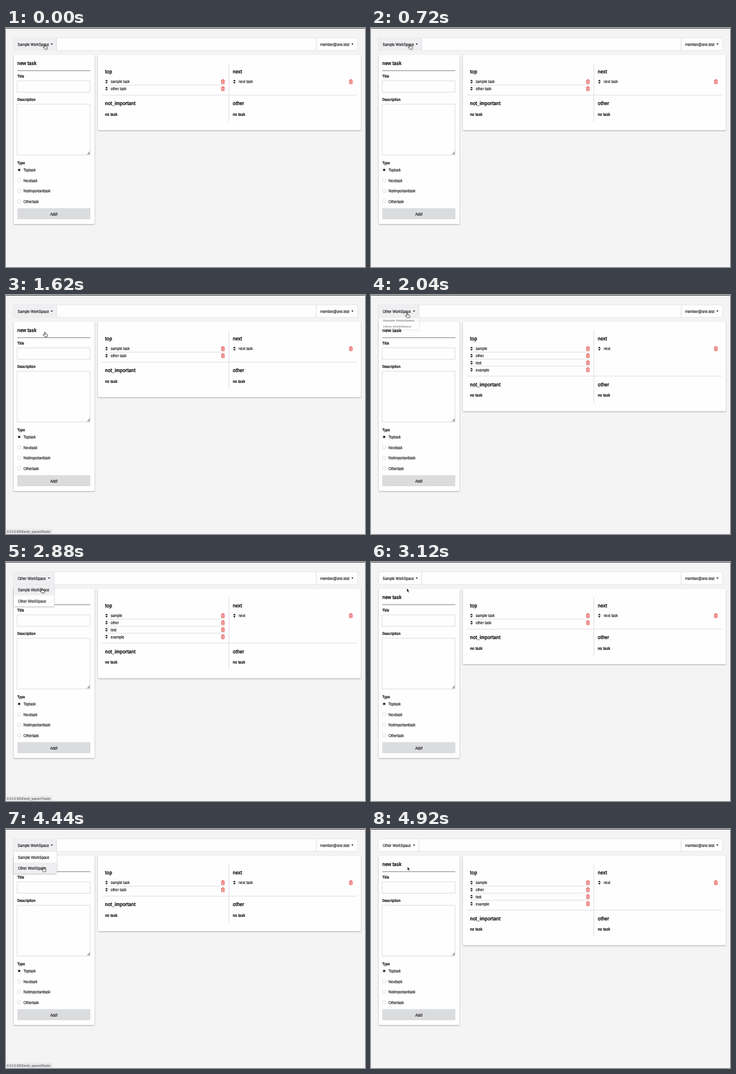
Recreate the animation shown at these times as an HTML page. Size 600x400 px, loop 4.98 s.

```html
<!DOCTYPE html>
<html lang="en">
<head>
<meta charset="utf-8">
<title>Task board</title>
<style>
:root { --paper: #f4f4f5; --hover: #efeff1; --line: #dedee3; --ink: #0c0c0e; }
html, body { margin: 0; width: 100%; height: 100%; overflow: hidden; background: var(--paper); }
svg { display: block; width: 600px; height: 400px; }

/* The screen has narrow pixels, so all type shares one aspect ratio. */
text {
  font: 7.2px "Liberation Sans", Arial, sans-serif;
  fill: var(--ink); stroke: var(--ink); stroke-width: .15px;
  text-rendering: geometricPrecision;
  transform-box: fill-box; transform-origin: left; transform: scaleX(.825);
}
.head { font-size: 9.2px; font-weight: bold; }
.label { font-size: 6.7px; font-weight: bold; }
.bold { font-weight: bold; }
.mid { text-anchor: middle; transform-origin: center; }
.url { font-size: 5.85px; fill: #3c3c40; stroke: none; }

.card { fill: #fefefe; filter: drop-shadow(0 1px 1.3px rgba(30, 30, 50, .35)); }
.bar { fill: #fefefe; stroke: var(--line); stroke-width: .7; }
.line { fill: none; stroke: var(--line); }
.field { fill: #fefefe; stroke: var(--line); }
.hover { fill: var(--hover); }
.solid { fill: var(--ink); }
.bin { fill: none; stroke: #e2403c; stroke-width: .9; }

.sample, .other, .active, .arrow, .hand, .menu, .first, .second, .status, .cursor {
  animation: 4980ms step-end infinite;
}
.sample { animation-name: sample; }
.other { animation-name: other; }
.active, .hand { animation-name: pointing; }
.arrow { animation-name: idle; }
.first { animation-name: first; }
.second { animation-name: second; }
.menu { animation-name: slide; animation-timing-function: ease; transform-origin: 0 38px; }
.status { animation-name: status; animation-timing-function: linear; }
.cursor { animation-name: move; animation-timing-function: ease-in-out; }

@keyframes sample {
  0%, 61.8% { visibility: visible; }
  34.1%, 94.4%, 100% { visibility: hidden; }
}
@keyframes other {
  0%, 61.8% { visibility: hidden; }
  34.1%, 94.4%, 100% { visibility: visible; }
}
@keyframes pointing {
  0%, 38.2%, 66.3% { opacity: 1; }
  34.1%, 61.8%, 94.4%, 100% { opacity: 0; }
}
@keyframes idle {
  0%, 38.2%, 66.3% { opacity: 0; }
  34.1%, 61.8%, 94.4%, 100% { opacity: 1; }
}
@keyframes slide {
  0%, 16.5%, 34.1%, 39.7%, 61.8%, 68.7%, 94.4%, 100% { opacity: 0; transform: scaleY(0); }
  20.5%, 30.1%, 43.7%, 57.8%, 72.7%, 90.4% { opacity: 1; transform: scaleY(1); }
}
@keyframes first {
  0%, 25.1%, 61.8%, 77.3%, 100% { opacity: 0; }
  23.7%, 49.4%, 75.4% { opacity: 1; }
}
@keyframes second {
  0%, 34.1%, 94.4%, 100% { opacity: 0; }
  25.1%, 77.3% { opacity: 1; }
}
@keyframes status {
  0%, 26.3%, 34.2%, 51%, 61.9%, 77.7%, 94.5%, 100% { opacity: 0; }
  28.7%, 34.1%, 53.4%, 61.8%, 80.1%, 94.4% { opacity: 1; }
}
@keyframes move {
  0%, 21.7% { transform: translate(65px, 27.5px); }
  26.5%, 34.9% { transform: translate(65px, 62px); }
  39%, 45.2% { transform: translate(60.5px, 30px); }
  53%, 62.5% { transform: translate(60px, 44px); }
  67.7%, 72.9% { transform: translate(60px, 27px); }
  79.5%, 94.4% { transform: translate(62.5px, 63.5px); }
  96%, 100% { transform: translate(61px, 63px); }
}
</style>
</head>
<body>
<svg id="stage" viewBox="0 0 600 400"></svg>
<script>
const text = (x, y, words, kind = '') => `<text x="${x}" y="${y}" class="${kind}">${words}</text>`;
const rect = (x, y, w, h, kind, r = 0) =>
  `<rect x="${x}" y="${y}" width="${w}" height="${h}" rx="${r}" class="${kind}"/>`;
const path = (d, kind = '', more = '') => `<path d="${d}" class="${kind}" ${more}/>`;
const group = (kind, ...parts) => `<g class="${kind}">${parts.join('')}</g>`;
const caret = x => path(`M${x - 1.7} 26h3.4l-1.7 2.2z`, 'solid');

const ROW = 11.75;

const task = (x, y, name, binX) =>
  path(`M${x} ${y - .7}h4.4l-2.2 -2.5zM${x} ${y + .7}h4.4l-2.2 2.5z`, 'solid') +
  text(x + 9.3, y + 2.5, name) +
  path(`M${binX - 3} ${y - 2.2}h6M${binX - 1} ${y - 2.4}v-1h2v1M${binX - 2.2} ${y - 2}v5.4h4.4v-5.4` +
    `M${binX - .7} ${y - .8}v3M${binX + .7} ${y - .8}v3`, 'bin');

function board(top, next) {
  const grow = (top.length - 2) * ROW;
  return rect(153.5, 45, 439.5, 126 + grow, 'card', 1.5) +
    path(`M160 ${112.3 + grow}H587M372.5 59V${157 + grow}`, 'line') +
    text(165.5, 75.8, 'top', 'head') + text(379, 75.8, 'next', 'head') +
    top.map((name, i) => task(165.8, 89.8 + i * ROW, name, 362.5) +
      (i ? path(`M166 ${83.9 + i * ROW}H366`, 'line') : '')).join('') +
    task(379.5, 89.8, next, 576.3) +
    [[165.5, 'not_important'], [379, 'other']].map(([x, name]) =>
      text(x, 129 + grow, name, 'head') + text(x, 146.6 + grow, 'no task', 'bold')).join('');
}

function page(kind, name, width, top, next, id) {
  return group(kind,
    board(top, next),
    rect(13, 16.5, width, 21, 'hover active'),
    path(`M${12.5 + width} 16.5v21`, 'line'),
    text(19.5, 29.6, name), caret(width + 4.5),
    group('menu',
      rect(13, 38, width, 36.5, 'card'),
      rect(13, 38, width, 18, 'hover first'),
      rect(13, 56, width, 18.5, 'hover second'),
      text(20, 49.5, 'Sample WorkSpace'), text(20, 67.7, 'Other WorkSpace')),
    group('status',
      path('M0 391.5H76q1.5 0 1.5 1.5V400H0z', '', 'fill="#e9e9eb"'),
      text(1.5, 398, `0.0.0.0:3000/work_spaces/${id}/tasks`, 'url')));
}

const radio = (name, i) => {
  const y = 237.5 + i * 17.5;
  return `<circle cx="22" cy="${y}" r="3" class="field"/>` +
    (i ? '' : `<circle cx="22" cy="${y}" r="1.8" class="solid"/>`) + text(29.3, y + 2.6, name);
};

const header = rect(12.5, 16.5, 575, 21, 'bar') + path('M518.5 16.5v21', 'line') +
  text(525, 29.6, 'member@one.test') + caret(579);

const form = rect(13, 45, 135, 283, 'card', 1.5) +
  text(19, 61.6, 'new task', 'head') +
  path('M19 71.5H141', '', 'stroke="#85858e"') +
  text(19, 83.4, 'Title', 'label') + rect(18.5, 88.5, 122, 19, 'field') +
  text(19, 122.4, 'Description', 'label') + rect(18.5, 127.5, 122, 85, 'field') +
  path('M135 211.5l5 -5.5v5.5z', '', 'fill="#a6a6aa"') +
  text(19, 227.8, 'Type', 'label') +
  ['Toptask', 'Nexttask', 'Notimportanttask', 'Othertask'].map(radio).join('') +
  '<rect x="19" y="301.5" width="122" height="18.5" rx="1" fill="#dbdcde"/>' +
  text(80, 313.6, 'Add!', 'mid');

const cursor = group('cursor',
  path('M-.8 .6q.8 -1 1.6 0V3.1l2.6 .6q1 .3 .9 1.3L3.7 8H-.2L-2.8 4.8q.2 -1.2 1.2 -.5l.8 .7z', 'hand',
    'fill="#fff" stroke="#111" stroke-width=".75"'),
  path('M0 0V6.2L1.3 5l1 2.3 1 -.5 -1 -2.1h1.8z', 'arrow',
    'fill="#111" stroke="#fff" stroke-width=".4"'));

document.getElementById('stage').innerHTML =
  '<rect width="600" height="1" fill="#4a4a4c"/>' + header + form +
  page('sample', 'Sample WorkSpace', 72, ['sample task', 'other task'], 'next task', 8) +
  page('other', 'Other WorkSpace', 67.5, ['sample', 'other', 'test', 'example'], 'next', 7) +
  cursor;
</script>
</body>
</html>
```
